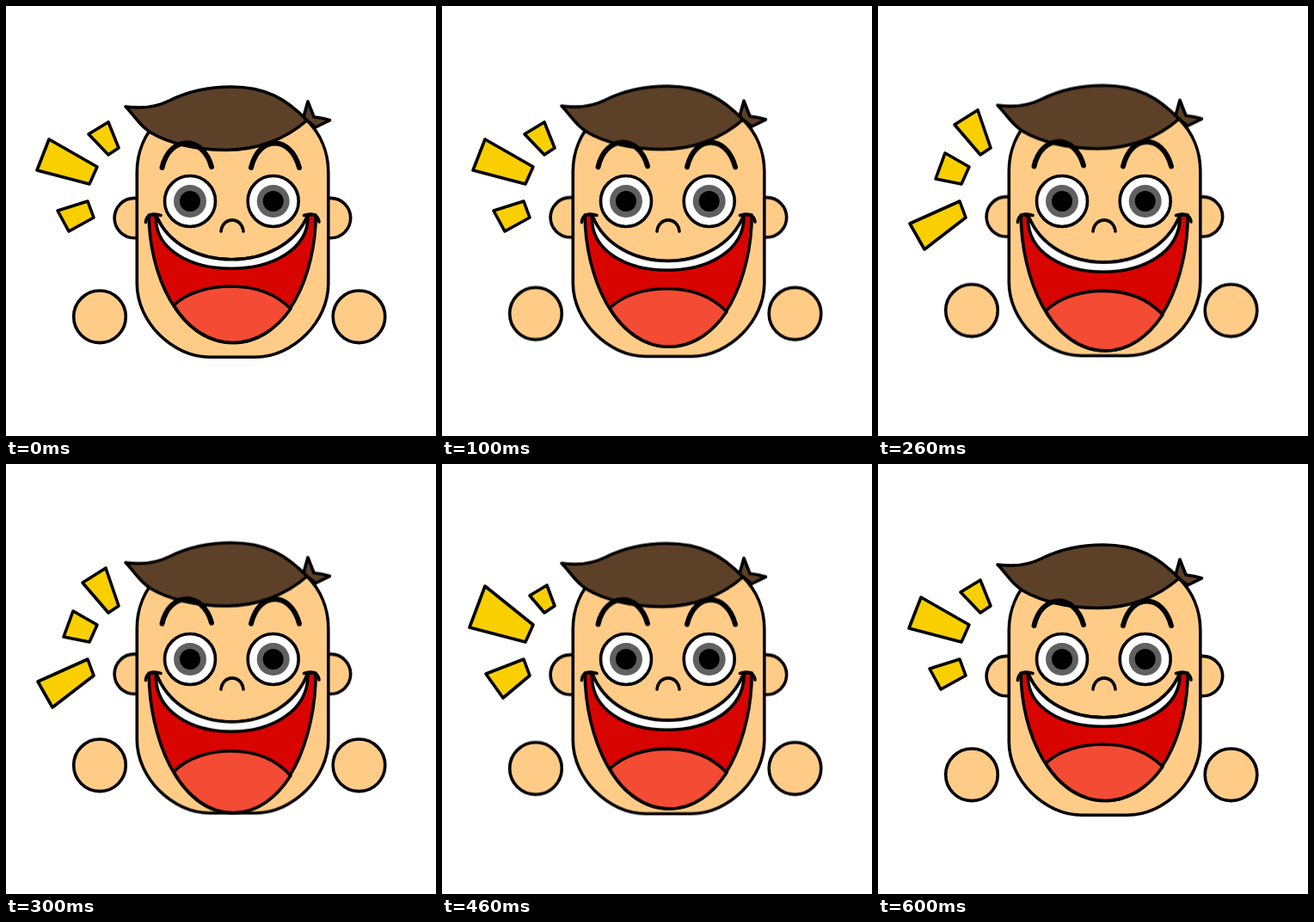
Animation of 500 by 500 pixels, one loop 700 ms. Source, as an HTML page:

```html
<!DOCTYPE html>
<html lang="en">
<head>
<meta charset="utf-8">
<title>Laughing face</title>
<style>
  html, body { margin: 0; width: 100%; height: 100%; overflow: hidden; background: #fff; }
  svg { display: block; width: 100%; height: 100%; }

  .ink { stroke: #000; stroke-width: 3.6; stroke-linejoin: round; stroke-linecap: round; }
  .ink path { vector-effect: non-scaling-stroke; }
  .skin { fill: #ffcc88; }
  .hair { fill: #5c4028; }
  .line { fill: none; }
  .brow { fill: none; stroke-width: 6; }
  .sparks { fill: #f9cf00; }

  /* Out in three steps, back in three, with a rest at both ends */
  .hands, .head, .mouth { animation: bob 700ms infinite; }
  .hands { --open: translateY(-11px); }
  .head  { --open: translateY(-2.4px); }
  .mouth { --open: scaleY(1.095); transform-origin: 0 243px; }
  @keyframes bob {
    0%        { transform: none; animation-timing-function: steps(3, jump-end); }
    42.857%   { transform: var(--open); animation-timing-function: steps(4, jump-none); }
    100%      { transform: none; }
  }

  .sparks path { animation: flash 700ms step-end infinite; }
  .sparks .rest { animation-name: flash-long; animation-delay: -100ms; }
  .sparks .tall { animation-delay: -500ms; }
  .sparks .wide { animation-delay: -300ms; }
  @keyframes flash {
    0% { visibility: visible; }
    28.571%, 100% { visibility: hidden; }
  }
  @keyframes flash-long {
    0% { visibility: visible; }
    42.857%, 100% { visibility: hidden; }
  }
</style>
</head>
<body>
<svg viewBox="0 0 500 500">
  <g class="ink">
    <g class="sparks">
      <path class="rest" d="M50 155L106 187L97 207L36 191Z M96 149L119 135L131 165L119 173Z M60 238L95 227L102 246L73 262Z"/>
      <path class="tall" d="M89 138L116 121L131 165L119 173Z M78 171L106 187L97 207L67 201Z M37 253L95 227L102 246L54 283Z"/>
      <path class="wide" d="M50 142L106 187L97 207L32 190Z M102 153L122 141L131 165L119 173Z M51 244L95 227L102 246L71 272Z"/>
    </g>

    <g class="hands skin">
      <circle cx="109" cy="361.3" r="30.3"/>
      <circle cx="410.5" cy="361.3" r="30.3"/>
    </g>

    <g class="head">
      <circle class="skin" cx="149.3" cy="246.6" r="23.2"/>
      <circle class="skin" cx="377.5" cy="246.6" r="23.2"/>
      <path class="skin" d="M152.300 193C152.300 146 190 108 237 108H290C337 108 374.800 146 374.800 193V323C374.800 367 334 408.200 290 408.200H237C193 408.200 152.300 367 152.300 323Z"/>
      <path class="hair" d="M346 129L351 111L358 129Q368 130 376.500 132.800L360 141L350 133Z"/>
      <path class="hair" d="M139 117C160 120 176 117 190 110C214 98 240 94 262 94C302 94 326 108 350 133C325 155 292 167.500 256 167.500C220 167.500 188 159 168 147C155 139 150 128 139 117Z"/>
      <path class="brow" d="M181.500 188C190 150 229 150 239 187"/>
      <path class="brow" d="M285 188C294 150 331 150 341 188"/>
    </g>

    <g fill="#fff">
      <circle cx="214" cy="227" r="29.5"/>
      <circle cx="310.700" cy="227" r="29.5"/>
    </g>
    <g stroke="none">
      <g fill="#606060">
        <circle cx="214" cy="227" r="19"/>
        <circle cx="310.700" cy="227" r="19"/>
      </g>
      <circle cx="214" cy="227" r="12"/>
      <circle cx="310.700" cy="227" r="12"/>
    </g>
    <path class="line" d="M250 262C252 244.500 274 244.500 276 262"/>

    <g class="mouth">
      <path fill="#d80400" d="M166.200 243C166.200 310 200 391.500 264 391.500S360.200 310 360.200 243L351 243C323 312 202 312 174.500 243Z"/>
      <path fill="#f44b35" d="M195 348C212 332 238 326 262 326C288 326 313 334 331 352C315 375 292 391.500 264 391.500S211 374 195 348Z"/>
      <path fill="#fff" d="M174.500 243C169 326 354 326 351 243C323 312 202 312 174.500 243Z"/>
    </g>
    <path class="line" d="M162.500 251.500C163 243 170 240 180 243.500"/>
    <path class="line" d="M346.500 243.500C356 240 363 243 364 251"/>
  </g>
</svg>
</body>
</html>
```
